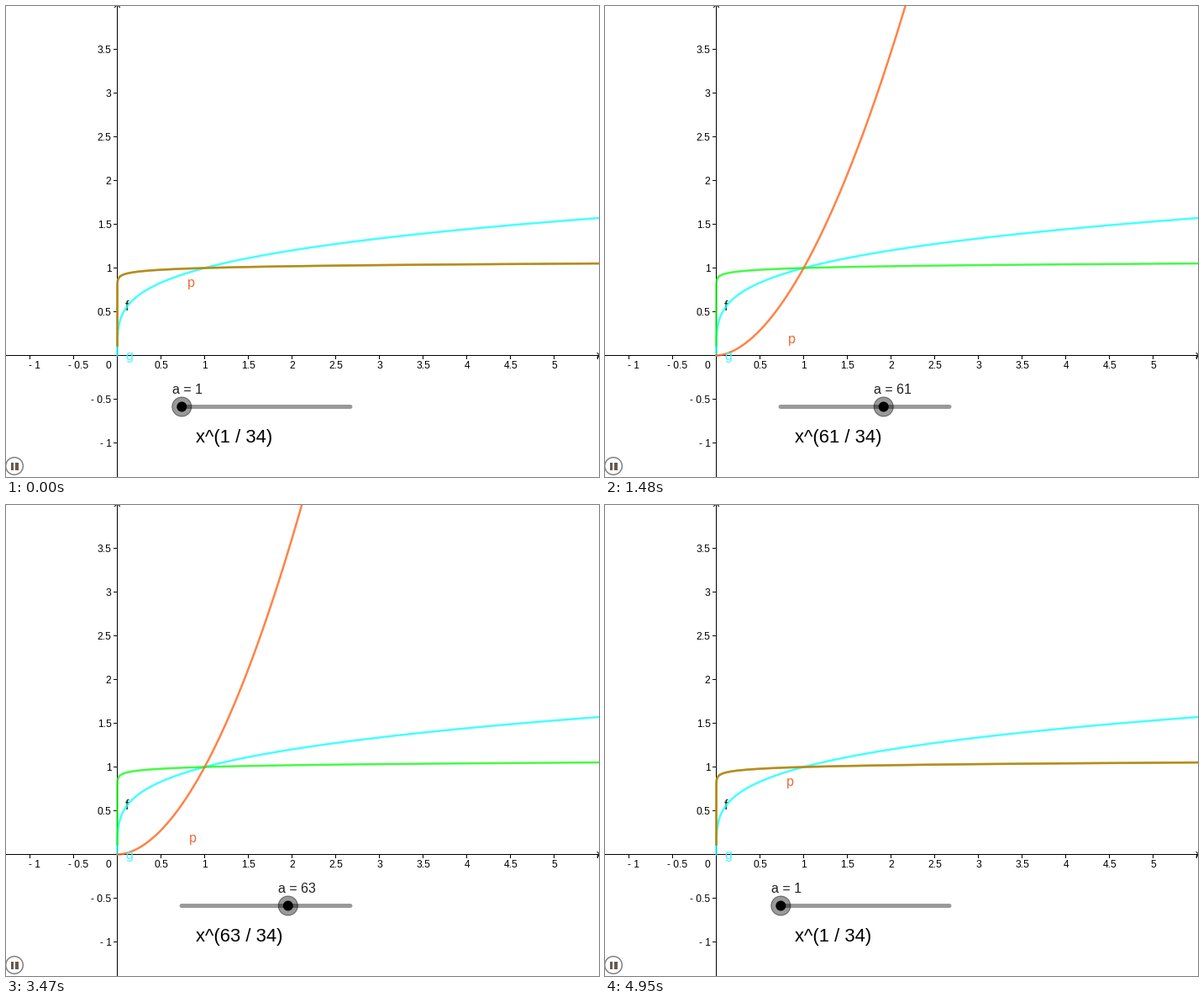
These frames come from a looping animation (706x560 px, 5010 ms). A matplotlib script:

```python
import numpy as np
import matplotlib.pyplot as plt
from matplotlib.animation import FuncAnimation
from matplotlib.patches import Circle, Rectangle

W, H, DPI = 706, 560, 100
PT = 72 / DPI                    # points per pixel
LOOP, INTERVAL = 5010, 30
POSES, LEAD = 88, 22             # slider poses per loop; ms to centre the rounding
OX, OY, UNIT = 132.5, 415.5, 104  # origin and scale of the plot
DENOM = 34

ORANGE, BROWN = "#ff6419", "#e06b16"
GREEN, CYAN = "#18f918", "#18ffff"

plt.rcParams["font.family"] = "Liberation Sans"
fig = plt.figure(figsize=(W / DPI, H / DPI), dpi=DPI, facecolor="white")
ax = fig.add_axes([0, 0, 1, 1])
ax.set_xlim(0, W)
ax.set_ylim(H, 0)
ax.axis("off")

# Dense near zero, where small powers rise almost vertically
XS = np.concatenate([np.geomspace(1e-32, 0.01, 250), np.linspace(0.011, 5.6, 500)])


def line(x, y, color="black", width=1.0, z=1, **kw):
    return ax.plot(x, y, color=color, lw=width * PT, zorder=z, snap=False, **kw)[0]


def text(x, y, s, size, color="black", ha="left", z=6):
    return ax.text(x, y, s, fontsize=size * PT, color=color, ha=ha,
                   va="baseline", zorder=z)


def power(k):
    return OX + UNIT * XS, OY - UNIT * XS ** k


def number(v):
    return ("- " if v < 0 else "") + f"{abs(v):g}"


def draw_axes():
    line([0, W], [OY, OY])
    line([OX, OX], [0, H])
    line([OX - 3, OX, OX + 3], [1.5, -1.5, 1.5])
    line([W - 2, W + 1, W - 2], [OY - 3, OY, OY + 3])
    for i in range(-2, 12):
        x = OX + UNIT * i / 2
        if i:
            line([x, x], [OY, OY + 4])
        if i == 0:
            text(122, 431, "0", 12, ha="center")
        elif i < 11:
            text(x + (5.5 if i < 0 else 0.3), 431, number(i / 2), 12, ha="center")
    for i in range(-2, 8):
        if i:
            y = OY - UNIT * i / 2
            line([OX - 4, OX], [y, y])
            text(125.5, y + 4.5, number(i / 2), 12, ha="right")


def draw_pause():
    ax.add_patch(Circle((10, 547), 10.3, fc="white", ec="#808080", lw=1.5 * PT, zorder=5))
    for x in (5.5, 11):
        ax.add_patch(Rectangle((x, 542.5), 3.6, 9, fc="#665a50", lw=0, zorder=6))


draw_axes()
draw_pause()
line(*power(9 / DENOM), CYAN, 2.5, 2, alpha=0.8)
line(*power(1 / DENOM), GREEN, 2.5, 3, alpha=0.8)
text(142, 362, "f", 16, "#062a06", z=1.5)
text(142, 421, "g", 16, "#46f4ff")

line([209, 410], [476.5, 476.5], "#999999", 5, 4, solid_capstyle="round")
knob = Circle((209, 476.5), 11.5, fc=(0, 0, 0, 0.4), ec=(0, 0, 0, 0.5),
              lw=1 * PT, zorder=5)
dot = Circle((209, 476.5), 6, fc="black", lw=0, zorder=6)
ax.add_patch(knob)
ax.add_patch(dot)

curve = line([], [], ORANGE, 2.5, 4, alpha=0.8)
p_label = text(216, 400, "p", 16, "#ee6830")
a_label = text(198, 461, "", 16, "#202020")
formula = text(226.5, 519, "", 22)

# The slider moves by 2 per tick; now and then two ticks fall into one pose
KEY_POSES = [0, 10, 13, 20, 26, 38, 50, 53, 68, 70, 80, 87]
KEY_TICKS = [0, 11, 14, 23, 30, 44, 56, 60, 78, 80, 91, 99]


def slider_value(ms):
    pose = int((ms + LEAD) * POSES / LOOP)
    tick = int(round(np.interp(pose, KEY_POSES, KEY_TICKS)))
    return 1 + 2 * min(tick, KEY_TICKS[-1] - tick)


def update(i):
    a = slider_value(i * INTERVAL)
    curve.set_data(*power(a / DENOM))
    curve.set_color(BROWN if a == 1 else ORANGE)

    # The label hangs from the first plotted point of the curve
    p_label.set_position((218 if a > 51 else 216, 401 - UNIT * 0.645 ** a))

    x = 209 + 2.04 * (a - 1)
    knob.center = dot.center = (x + 0.3, 476.5)
    a_label.set_position((x - 11.5, 461))
    a_label.set_text(f"a = {a}")
    formula.set_text(f"x^({a} / {DENOM})")
    return curve, p_label, knob, dot, a_label, formula


anim = FuncAnimation(fig, update, frames=LOOP // INTERVAL, interval=INTERVAL,
                     repeat=True, repeat_delay=0, blit=False)
plt.show()
```
